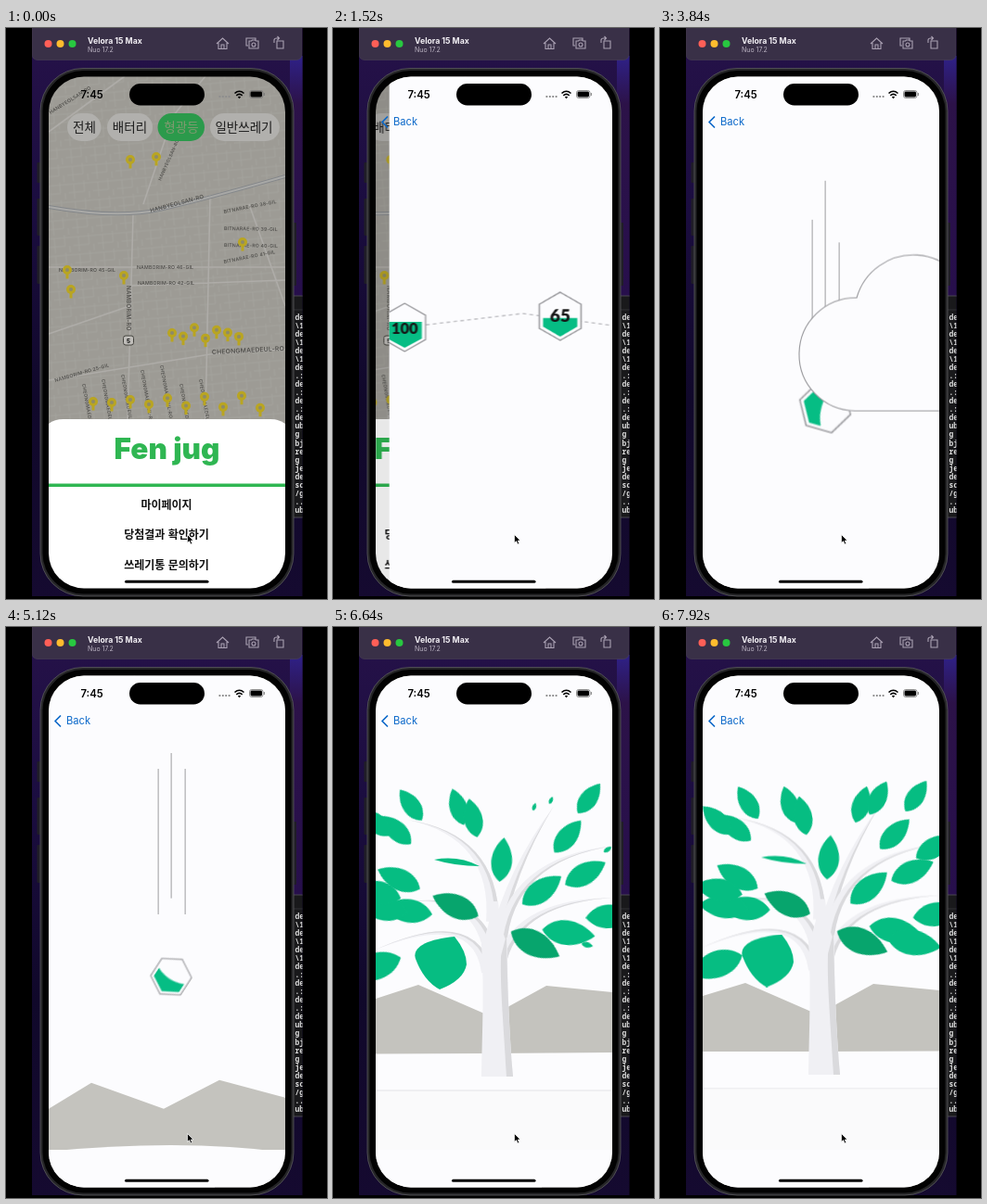
An HTML page that plays this animation: 346 by 616 pixels, repeating every 8 s.

```html
<!DOCTYPE html>
<html lang="ko">
<head>
<meta charset="utf-8">
<title>Green result</title>
<style>
html, body { margin: 0; height: 100%; overflow: hidden; background: #000; }
svg { display: block; width: 100vw; height: 100vh; font-family: Inter, "Noto Sans CJK KR", "Noto Sans CJK", sans-serif; }
.ko { font-family: "Noto Sans CJK KR", "Noto Sans CJK", sans-serif; text-anchor: middle; }
.pill { font-size: 13.5px; font-weight: 500; fill: #1b1b1b; }
.menu { font-size: 12px; font-weight: 600; fill: #111; }
.mono { font: 700 8px "Noto Sans Mono", "DejaVu Sans Mono", monospace; fill: #dcdcdc; }
.road { font-weight: 500; fill: #494845; letter-spacing: .2px; }
.num { font-family: Lato, sans-serif; font-weight: 900; fill: #161616; text-anchor: middle; }
.edge { fill: #fcfcfe; stroke: #98989c; stroke-width: 1.4; }
.a { animation: 8s linear infinite both; }

.under { animation-name: under; }
.shade { animation-name: shade; }
.page { animation-name: page; }
.back { animation-name: back; }
.trail { animation-name: trail; }
.seed { animation-name: seed; }
.liquid { animation-name: liquid; }
.count { animation-name: count; }
.streak { animation-name: rise, stretch; animation-delay: 0s, var(--wait); }
.cloud { animation-name: cloud; }
.hills { animation-name: hills; }
.ground { animation-name: ground; }
.floor { animation-name: floor; }
.drift { animation-name: drift; }
.grow { animation-name: grow; }
.sprout { animation-name: sprout; }
.late { animation-name: late; }
.leaf { animation-name: leaf; }

@keyframes page {
  0%, 15% { transform: translateX(256px); animation-timing-function: cubic-bezier(.2, .6, .2, 1); }
  22%, 100% { transform: none; }
}
@keyframes under {
  0%, 15% { transform: none; animation-timing-function: cubic-bezier(.2, .6, .2, 1); }
  22%, 100% { transform: translateX(-76px); }
}
@keyframes shade { 0%, 15% { opacity: 0; } 18%, 100% { opacity: .09; } }
@keyframes back { 0%, 15% { opacity: 0; } 19%, 100% { opacity: 1; } }
@keyframes trail {
  0%, 15% { transform: translateX(90px); opacity: 1; }
  22%, 27% { transform: translateX(-32px); opacity: 1; }
  31%, 100% { transform: translate(-32px, -180px); opacity: 0; }
}
@keyframes seed {
  0%, 15% { transform: translate(300px, 311px); }
  22%, 26% { transform: translate(178px, 311px); }
  34% { transform: translate(178px, 437px) rotate(-190deg) scale(1.31); opacity: 1; }
  64% { transform: translate(178px, 377px) rotate(-327deg) scale(.85); opacity: 1; }
  71% { transform: translate(178px, 474px) rotate(-360deg) scale(.35); opacity: 1; }
  73%, 100% { transform: translate(178px, 484px) rotate(-360deg) scale(0); opacity: 0; }
}
@keyframes liquid {
  0%, 26% { d: path("M-18.5 2Q0 2 18.5 2V11L0 22L-18.5 11Z"); }
  32%, 100% { d: path("M-19 -1Q0 8 19 -1V11L0 22L-19 11Z"); }
}
@keyframes count { 0%, 25% { opacity: 1; } 28%, 100% { opacity: 0; } }
@keyframes rise { 0%, 34% { y: var(--from); } 64%, 100% { y: var(--to); } }
@keyframes stretch { 0%, 29% { height: 0; } 34%, 64% { height: 157px; } 69%, 100% { height: 0; } }
@keyframes cloud {
  0%, 39% { transform: translateY(340px); }
  57%, 100% { transform: translateY(-340px); }
}
@keyframes hills {
  0%, 60% { d: path("M46 600L92 572L170 600L230 569L301 588V720H46Z"); }
  64% { d: path("M46 520L92 492L170 520L230 489L301 508V640H46Z"); animation-timing-function: ease-out; }
  72%, 83% { d: path("M46 401L92 386L170 420L230 387L301 394V520H46Z"); }
  99%, 100% { d: path("M46 398L92 384L170 418L230 385L301 392V518H46Z"); }
}
@keyframes ground {
  0%, 60% { d: path("M46 646Q190 632 301 647V720H46Z"); }
  64% { d: path("M46 566Q190 552 301 567V640H46Z"); animation-timing-function: ease-out; }
  72%, 83% { d: path("M46 460.5Q173 460 301 459V640H46Z"); }
  99%, 100% { d: path("M46 458Q173 458 301 457.5V640H46Z"); }
}
@keyframes floor { 0%, 70% { opacity: 0; } 74%, 100% { opacity: 1; } }
@keyframes drift { 0%, 83% { transform: none; } 99%, 100% { transform: translateY(-2.5px); } }
@keyframes grow {
  0%, 71% { transform: scale(0); animation-timing-function: ease-out; }
  79%, 100% { transform: none; }
}
@keyframes sprout {
  0%, 75% { transform: scale(0); animation-timing-function: ease-out; }
  80%, 100% { transform: none; }
}
@keyframes late { 0%, 80% { transform: scale(0); } 94%, 100% { transform: none; } }
@keyframes leaf {
  0%, 83% { transform: none; animation-timing-function: ease-in-out; }
  99%, 100% { transform: translateX(var(--x)) rotate(var(--turn)); }
}
</style>
</head>
<body>
<svg viewBox="0 0 346 616" preserveAspectRatio="none">
  <defs>
    <linearGradient id="wall" x2="0" y2="1">
      <stop offset="0" stop-color="#261249"/><stop offset=".3" stop-color="#1b0d40"/>
      <stop offset=".65" stop-color="#10082a"/><stop offset="1" stop-color="#150a30"/>
    </linearGradient>
    <linearGradient id="glow" x2="0" y2="1">
      <stop offset="0" stop-color="#2f2188"/><stop offset=".2" stop-color="#2c1248"/><stop offset="1" stop-color="#270f4c"/>
    </linearGradient>
    <clipPath id="desk"><path d="M28 0H319.500V613H28Z"/></clipPath>
    <clipPath id="screen"><rect x="46" y="52.500" width="255" height="552" rx="38"/></clipPath>
    <clipPath id="stage"><path d="M46 112H301V564H46Z"/></clipPath>
    <pattern id="streets" width="26" height="19" patternUnits="userSpaceOnUse" patternTransform="rotate(-5)">
      <path d="M0 3H26M0 12H17M6 3V19M17 0V12M22 12V19" fill="none" stroke="#acaaa5" stroke-width=".7"/>
    </pattern>
    <g id="pin"><path d="M-1.500 3H1.500V9.500H-1.500Z"/><circle r="5"/><circle r="2" fill="#8d8a6a"/></g>
    <path id="hex" d="M0 -26L22.500 -13V13L0 26L-22.500 13V-13Z"/>
    <path id="blade" d="M-50 0C-28 -31 16 -31 50 0C16 31 -28 31 -50 0Z"/>
  </defs>

  <rect width="346" height="616"/>
  <g clip-path="url(#desk)">
    <rect x="28" width="292" height="616" fill="url(#wall)"/>
    <rect x="306" y="30" width="14" height="260" fill="url(#glow)"/>
    <rect x="290" y="289" width="40" height="239" fill="#19191b" stroke="#4b4950"/>
    <path d="M290 304H320" stroke="#303034"/>
    <g id="term" class="mono"></g>

    <rect x="28" y="-10" width="291" height="44.500" rx="6" fill="#393047" stroke="#4b4257" stroke-width=".6"/>
    <circle cx="45.500" cy="17" r="4" fill="#fe5f57"/><circle cx="58.500" cy="17" r="4" fill="#febc2e"/><circle cx="71.500" cy="17" r="4" fill="#28c840"/>
    <text x="88" y="16.500" font-size="8.700" font-weight="700" fill="#f4f1f6">Velora 15 Max</text>
    <text x="88" y="25.500" font-size="7" fill="#bdb5c4">Nuo 17.2</text>
    <g fill="none" stroke="#aaa1b3" stroke-width="1.100">
      <path d="M227 17L233.500 11L240 17M229 16V22.500H238V16M232 22V18H235V22"/>
      <path d="M261 19H259V11H269V13M262 14H264.500L265.500 13H268.500L269.500 14H272V22H262Z"/><circle cx="267" cy="18" r="2"/>
      <path d="M292 14H299V22H292ZM289 16V13Q289 11 292 11H294M292.500 9L294.500 11L292.500 13"/>
    </g>
  </g>

  <g fill="#201e27">
    <rect x="33.500" y="145" width="4" height="22" rx="1"/><rect x="33.500" y="184" width="4" height="40" rx="1"/>
    <rect x="33.500" y="235" width="4" height="41" rx="1"/><rect x="309" y="210" width="4" height="68" rx="1"/>
  </g>
  <rect x="37" y="43.500" width="273" height="569.500" rx="46" fill="#252527" stroke="#5c5c5f" stroke-width=".8"/>
  <rect x="39.500" y="46" width="268" height="564.500" rx="44" fill="#020202"/>

  <g clip-path="url(#screen)">
    <g class="a under">
      <rect x="46" y="52" width="332" height="553" fill="#9d9b95"/>
      <rect x="46" y="52" width="332" height="380" fill="url(#streets)" opacity=".6"/>
      <path d="M137 201L131 425M46 258H301M135 278L301 272M46 380L220 352L380 341M46 112L128 52M148 190L180 95L215 52M46 330L133 300M220 180L215 422M262 190L301 300"
        fill="none" stroke="#aeaca8" stroke-width="1.600"/>
      <path d="M46 193Q120 206 165 196T301 160" fill="none" stroke="#84878a" stroke-width="4"/>
      <path d="M46 193Q120 206 165 196T301 160" fill="none" stroke="#a9a9a7" stroke-width="2"/>
      <g id="labels"></g>
      <rect x="126.500" y="332" width="11" height="10" rx="2.500" fill="#c0beba" stroke="#45443f"/>
      <text x="132" y="339.500" font-size="6.500" font-weight="700" text-anchor="middle">5</text>
      <g id="pins" fill="#b9a522"></g>
      <g fill="#b1b0ad">
        <rect x="66" y="92" width="36.500" height="30" rx="15"/><rect x="109" y="92" width="49" height="30" rx="15"/>
        <rect x="163.500" y="92" width="50.500" height="30" rx="15" fill="#2b9a4b"/><rect x="220" y="92" width="75" height="30" rx="15"/>
      </g>
      <g class="ko pill">
        <text x="84.500" y="111.500">전체</text><text x="133.500" y="111.500">배터리</text>
        <text x="189" y="111.500" fill="#7f9a70">형광등</text><text x="256.500" y="111.500">일반쓰레기</text>
      </g>
      <path d="M46 605V427Q52 422 62 422H285Q295 422 301 427V605Z" fill="#fff"/>
      <text x="173.500" y="465" font-size="31.500" font-weight="900" fill="#2fb652" text-anchor="middle">Fen jug</text>
      <rect x="46" y="491.500" width="255" height="3.500" fill="#2fb652"/>
      <g class="ko menu">
        <text x="173" y="518.500">마이페이지</text><text x="173" y="551">당첨결과 확인하기</text><text x="173" y="583.500">쓰레기통 문의하기</text>
      </g>
    </g>
    <rect class="a shade" x="46" y="52" width="255" height="553"/>

    <g class="a page">
      <rect x="46" y="52" width="256" height="553" fill="#fcfcfe"/>
      <g clip-path="url(#stage)">
        <g class="a trail" style="animation-timing-function:cubic-bezier(.2,.6,.4,1)">
          <path d="M-44 326L83 323L210 308L337 325L420 330" fill="none" stroke="#c6c6ca" stroke-width="1.600" stroke-dasharray="4 3.500"/>
          <g transform="translate(83 323)">
            <use href="#hex" class="edge"/>
            <path d="M-18.500 -6H18.500V12L0 22L-18.500 12Z" fill="#06bd84"/>
            <text class="num" y="6.500" font-size="16.500">100</text>
          </g>
        </g>
        <g fill="#b2b2b5">
          <rect class="a streak" x="163.500" width="1.300" style="--from:254px;--to:153px;--wait:.48s"/>
          <rect class="a streak" x="177.500" width="1.300" style="--from:190px;--to:136px;--wait:0s"/>
          <rect class="a streak" x="192.500" width="1.300" style="--from:300px;--to:153px;--wait:.38s"/>
        </g>
        <g class="a seed">
          <use href="#hex" class="edge"/>
          <path class="a liquid" fill="#06bd84"/>
          <text class="num a count" y="6" font-size="19">65</text>
        </g>
        <path class="a cloud edge" style="stroke-width:1.100" d="M210 413.500A61 61 0 1 1 212 291.500A63.500 63.500 0 0 1 336 300A58 58 0 0 1 340 413.500Z"/>
        <path class="a hills" fill="#c4c3be"/>
        <path class="a ground" fill="#fcfcfe"/>
        <g class="a drift">
          <g class="a floor"><path d="M46 500H301V566H46Z" fill="#fafafb"/><path d="M46 500H301" stroke="#e4e4e7"/></g>
          <g class="a grow" style="transform-origin:177px 485px">
            <g id="wood"></g>
            <path d="M160 485C161 430 163 390 160 342Q169 325 171 296H178Q180 325 188 342C188 390 190 440 194 485Z" fill="#f0f0f4"/>
            <path d="M187 485C184 430 180 390 181 355L187 332C188 390 190 440 194 485Z" fill="#dadadd"/>
          </g>
          <g id="leaves" fill="#06bd82">
            <path class="a sprout" style="transform-origin:134px 254px" d="M109 251Q135 246 158 258Q132 258 109 251Z"/>
            <path class="a sprout" style="transform-origin:131px 334px" d="M131 334C100 337 85 346 89 358Q98 382 115 391Q141 381 144 364Q144 350 131 334Z"/>
          </g>
        </g>
      </g>
    </g>

    <g class="a back">
      <path d="M58.500 96L53 101.500L58.500 107" fill="none" stroke="#0b68c9" stroke-width="1.700" stroke-linecap="round" stroke-linejoin="round"/>
      <text x="65" y="105.300" font-size="11.200" fill="#0b68c9">Back</text>
    </g>
    <text x="92.500" y="75.500" font-size="11.300" font-weight="600" text-anchor="middle">7:45</text>
    <path d="M229.500 74H242" stroke="#8d8d8d" stroke-width="1.800" stroke-dasharray="1.800 1.600"/>
    <path d="M246.500 70.500Q251.500 66 256.500 70.500M248.300 72.800Q251.500 70 254.700 72.800" fill="none" stroke="#000" stroke-width="1.600"/>
    <path d="M249.800 74.500Q251.500 73 253.200 74.500L251.500 76.300Z"/>
    <rect x="262.500" y="67.500" width="14.500" height="8" rx="2.300" fill="none" stroke="#777" stroke-width=".8"/>
    <rect x="263.500" y="68.500" width="12.500" height="6" rx="1.400"/><path d="M278.300 70V73" stroke="#777"/>
    <rect x="128" y="595.800" width="90.500" height="3" rx="1.500"/>
  </g>
  <rect x="133" y="60" width="81" height="23.500" rx="11.700"/>
  <path d="M195.500 546.500V555.500L197.600 553.600L199 557L200.700 556.300L199.300 553H202Z" stroke="#fff" stroke-width=".7"/>
</svg>
<script>
const $ = id => document.getElementById(id);
const add = (parent, tag, attrs, text = '') => {
  const el = document.createElementNS('http://www.w3.org/2000/svg', tag);
  for (const k in attrs) el.setAttribute(k, attrs[k]);
  el.textContent = text;
  return parent.appendChild(el);
};

// Terminal edge
'de \\1 de \\1 de \\1 de .: de .: de .: de ub g bj re g je de sc /g .. ub'.split(' ')
  .forEach((s, i) => add($('term'), 'text', { x: 311.5, y: 314.5 + i * 9.07 }, s));

// Map labels
const label = (text, x, y, turn = 0, size = 5.2) =>
  add($('labels'), 'text', { class: 'road', 'font-size': size, transform: `translate(${x} ${y}) rotate(${turn})` }, text);
label('HANBYEOLSAN-RO', 156, 199, -15, 6);
label('HANBYEOLSAN-RO', 48, 93, -32);
label('HANBYEOLSAN-RO 25-GIL', 167, 165, -66, 4.8);
label('NAMBORIM-RO 46-GIL', 141, 260);
label('NAMBORIM-RO 42-GIL', 142, 277);
label('NAMBORIM-RO 45-GIL', 57, 263);
label('NAMBORIM-RO 25-GIL', 53, 382, -16);
label('NAMBORIM-RO', 129.5, 278, 90, 6.2);
label('CHEONGMAEDEUL-RO', 222, 352, -3, 6.8);
for (let i = 0; i < 4; i++) label(`BITNARAE-RO ${38 + i}-GIL`, 235, 200 + i * 18, i % 3 ? 1 : -11);
for (let i = 0; i < 7; i++) label('CHEONGMAEDEUL-RO 55-GIL', 82 + i * 21, 384 - i % 5 * 5, 80, 5);

// Pins: a wavy row, a second one above the sheet, and a few strays
const pin = (x, y) => add($('pins'), 'use', { href: '#pin', x, y });
for (let i = 0; i < 7; i++) pin(179 + i * 12, 329 + 6 * Math.sin(i * 2.5));
for (let i = 0; i < 10; i++) pin(94 + i * 20, 403 + 7 * Math.sin(i * 3));
[[134, 142], [162, 139], [255, 231], [66, 261], [70, 282], [127, 267]].forEach(p => pin(...p));

// Tapered branch: start, bend, end, half width
function branch(x0, y0, cx, cy, x1, y1, w) {
  const side = (dx, dy, k) => { const n = k / Math.hypot(dx, dy); return [-dy * n, dx * n]; };
  const [ax, ay] = side(cx - x0, cy - y0, w), [bx, by] = side(x1 - x0, y1 - y0, w * .55);
  const edge = s => [`${x0 + ax * s} ${y0 + ay * s}`, `${cx + bx * s} ${cy + by * s}`];
  const shape = (s, e, fill) => {
    const [p, q] = edge(s), [r, u] = edge(e);
    add($('wood'), 'path', { d: `M${p}Q${q} ${x1} ${y1}Q${u} ${r}Z`, fill });
  };
  shape(-1, 1, '#f0f0f4');
  shape(.3, 1, '#dadadd');
}
branch(172, 318, 175, 225, 80, 208, 7);
branch(168, 345, 152, 290, 85, 296, 7);
branch(166, 372, 152, 302, 44, 349, 6);
branch(177, 335, 190, 265, 238, 193, 7);
branch(180, 345, 190, 250, 303, 236, 7);
branch(182, 357, 203, 295, 303, 292, 6);

// A leaf points away from the crown; lower leaves are longer, outer left ones swing inward
function leaf(x, y, kind) {
  const dx = x - 175, dy = y - 320, angle = Math.atan2(dy, dx) * 180 / Math.PI;
  const size = (40 + (y - 185) * .12) / 100;
  const spot = add($('leaves'), 'g', { transform: `translate(${x} ${y})` });
  const bud = add(spot, 'g', { class: 'a ' + kind });
  const sway = add(bud, 'g', { class: 'a leaf', style: `--x:${Math.max(0, -dx * .12)}px;--turn:${5 * Math.sin(x)}deg` });
  const blade = add(sway, 'use', { href: '#blade', transform: `rotate(${angle}) scale(${size})` });
  if (Math.hypot(dx, dy) < 50) blade.setAttribute('fill', '#07a56d');
}
[[84, 192], [135, 194], [151, 206], [68, 219], [46, 211], [182, 251], [132, 301], [71, 272], [80, 306], [54, 304], [48, 286], [44, 367],
 [276, 185], [253, 226], [225, 284], [272, 266], [300, 312], [218, 342], [254, 330]].forEach(p => leaf(...p, 'sprout'));
[[217, 194], [235, 187], [296, 240], [274, 343]].forEach(p => leaf(...p, 'late'));
</script>
</body>
</html>
```
